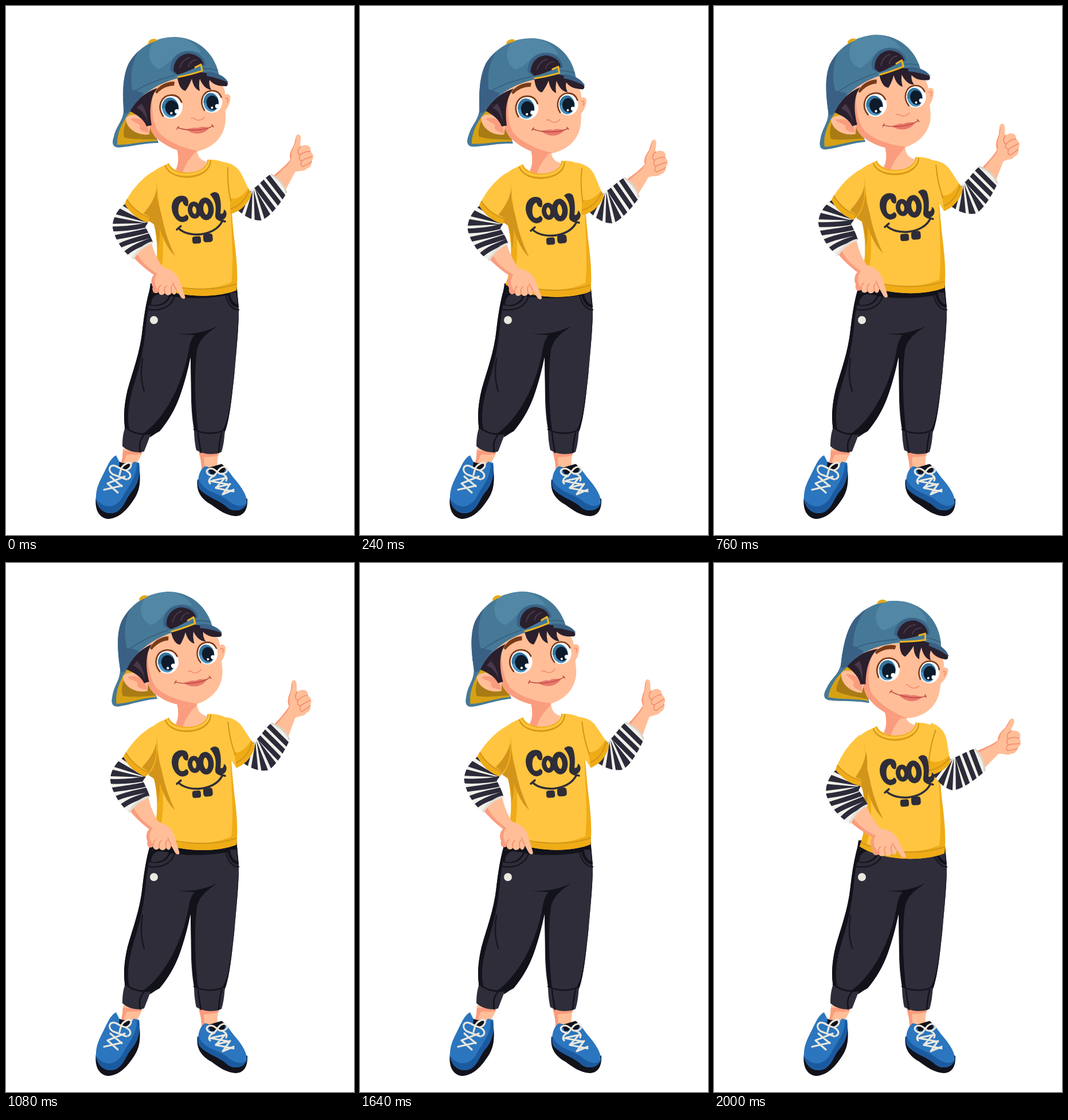
Recreate the animation shown at these times as an HTML page without scripts. Size 607 px wide and 923 px high, loop 2.04 s.

```html
<!DOCTYPE html>
<html lang="en">
<head>
<meta charset="utf-8">
<title>Thumbs up</title>
<style>
@property --q { syntax: "<number>"; inherits: true; initial-value: 0; }
html, body { margin: 0; width: 100%; height: 100%; overflow: hidden; background: #fff; }
svg { display: block; width: 100%; height: 100%; animation: bob 2040ms linear infinite; }

/* --q is the single pose value: positive sinks, negative rises */
@keyframes bob {
  0% { --q: 0 }
  5.88% { --q: 17 }
  7.84% { --q: 20 }
  11.76% { --q: 10 }
  15.69% { --q: -15 }
  19.61% { --q: -40 }
  21.57% { --q: -45 }
  23.53% { --q: -46 }
  27.45% { --q: -40 }
  33.33% { --q: -24 }
  37.25% { --q: -20 }
  52.94% { --q: -21 }
  80.39% { --q: -22.5 }
  84.31% { --q: -20 }
  88.24% { --q: -7 }
  92.16% { --q: 16 }
  95.1% { --q: 36 }
  98.04%, 100% { --q: 48 }
}
.body { transform: translateY(calc(var(--q) * .22px)); }
.arm-l { transform: rotate(calc(var(--q) * -.13deg)); transform-origin: 255px 300px; }
.arm-r { transform: rotate(calc(var(--q) * .35deg)); transform-origin: 390px 280px; }
.head { transform: translateY(calc(var(--q) * .2px)) rotate(calc(var(--q) * .22deg)); transform-origin: 292px 262px; }

.skin { fill: #ffbe98 }
.blush { fill: #fa9c7e }
.shirt { fill: #ffc540 }
.gold { fill: #efac17 }
.amber { fill: #d2941a }
.cloth { fill: #2e2d39 }
.ink { fill: #12121b }
.hair { fill: #2a1f2c }
.cap { fill: #467997 }
.navy { fill: #3a6185 }
.shoe { fill: #2b76bf }
.deep { fill: #1c5a9f }
.knit { fill: #f2f0e9 }
.line { fill: none; stroke-linecap: round; stroke-linejoin: round; }
.seam { stroke: #12121b; stroke-width: 2.5 }
.hem { stroke: #d2941a; stroke-width: 2 }
.fold { stroke: #f08c6e; stroke-width: 1.6 }
.stripe { stroke: #2c2b3a; stroke-width: 8.5; fill: none }
.fan { fill: #2c2b3a }
.lace { stroke: #ebe8df; stroke-width: 3.2 }
.print { stroke: #2e2d39; fill: none; stroke-linecap: round }
</style>
</head>
<body>
<svg viewBox="0 0 607 923" preserveAspectRatio="none">
<defs>
  <clipPath id="knitL"><path id="tubeL" d="M212 343C199 349 185 368 186 387C190 409 206 431 222 441C228 428 242 416 256 412C252 400 246 392 243 385L249 376Z"/></clipPath>
  <clipPath id="knitR"><path id="tubeR" d="M424 319C433 324 445 304 462 293C475 300 486 312 490 326C478 345 462 367 446 374C430 375 416 367 404 356Z"/></clipPath>
  <clipPath id="dome"><path id="crown" d="M205 178C203 150 204 120 214 100C232 70 262 54 296 54C338 56 366 86 372 123C350 118 330 117 312 123C270 131 232 154 216 184C207 190 206 190 205 178Z"/></clipPath>
  <g id="eye">
    <ellipse rx="20" ry="20.5" fill="#fff"/>
    <ellipse cx="-1.500" cy="1" rx="14.500" ry="17.500" fill="#4a93c2"/>
    <path d="M-16 1a14.500 17.500 0 0 1 29 0Z" fill="#35759f"/>
    <ellipse cx="1" cy="2" rx="11.500" ry="13.500" fill="#0d1b2b"/>
    <circle cx="9" cy="9" r="3.800" fill="#fff"/>
    <circle cx="-1" cy="11" r="2.200" fill="#fff"/>
    <path class="line" d="M-16 14C-25-3-15-21 1-20.500C11-20 17-14 19-6" stroke="#7b3c1b" stroke-width="2.800"/>
  </g>
</defs>

<g id="legs">
  <path class="skin" d="M204 772L239 774C236 788 226 800 221 808L199 802C204 790 203 782 204 772ZM336 776L372 777C368 790 368 800 370 812L341 812C342 798 338 786 336 776Z"/>
  <path class="blush" d="M204 776L238 776L236 782C222 784 214 781 210 784L204 800H199C204 790 203 784 204 776ZM336 777L372 778L370 784C358 788 348 786 345 788L347 811H341C342 798 338 786 336 777Z"/>

  <path class="ink" d="M157 856C154 878 162 894 179 895C198 893 210 880 221 864C233 848 235 832 233 810L190 845Z"/>
  <path class="shoe" d="M192 784C183 788 178 800 172 812C164 828 156 842 157 860C160 882 180 890 194 882C206 874 208 862 217 850C230 836 235 818 232 797L223 795C214 808 206 808 198 796Z"/>
  <path class="deep" d="M157 860C160 882 180 890 194 882C206 874 208 862 217 850C230 836 235 818 232 797L228 799C229 820 214 838 206 852C196 874 174 882 157 860Z"/>
  <path class="ink" d="M198 795C205 800 212 795 217 800L213 812C207 812 200 812 197 806Z"/>
  <path class="line lace" d="M182 821L202 838M207 821L177 833L195 849M202 837L171 844M186 817L210 826M186 817C176 810 181 798 192 803C200 807 206 811 210 810C222 805 220 792 209 799C200 803 200 812 198 818M210 811C218 815 219 822 213 825"/>

  <path class="ink" d="M334 826C331 848 342 861 358 870C372 880 384 889 400 890C414 890 422 880 421 860L380 840Z"/>
  <path class="shoe" d="M347 803C336 810 333 828 337 842C350 857 370 861 384 873C396 885 416 881 420 867C421 852 408 836 396 822L382 803C376 812 362 813 352 804Z"/>
  <path class="deep" d="M336 826C334 833 335 838 337 842C350 857 370 861 384 873C396 885 416 881 420 867C408 879 394 868 382 859C364 848 344 846 336 826Z"/>
  <path class="ink" d="M352 806L376 799C382 803 384 808 380 814L357 817Z"/>
  <path class="line lace" d="M357 829L390 835L378 852M383 822L366 841L397 847M360 828L384 823M366 840L391 834M378 852L397 844M363 820C348 820 346 807 358 807C366 808 370 816 374 816C386 817 391 806 380 804C372 805 370 812 363 820C355 823 352 829 356 833M374 816C382 817 387 823 384 828"/>

  <path class="cloth" d="M254 484C245 510 241 540 238 565C234 605 220 640 212 670C205 700 205 722 208 740L252 752C279 736 299 700 308 665L322 612L323 690C324 715 326 730 329 745L381 745C390 725 394 680 398 645C402 600 406 560 406 530L402 480Z"/>
  <path class="ink" d="M254 486C245 510 241 540 238 565C234 605 220 640 212 670C205 700 205 722 208 740L216 742C209 715 215 690 222 664C233 630 240 600 244 560C247 530 251 510 259 490Z"/>
  <path class="ink" d="M299 571C320 574 345 570 368 559C350 572 338 580 333 600C328 640 329 690 335 742L329 744C323 700 323 650 322 612C312 660 298 708 268 742L250 752L238 747C280 718 308 656 318 604C320 588 325 578 329 574C320 574 308 573 299 571Z"/>
  <path class="ink" d="M404 560C402 600 398 650 390 700C387 720 382 736 374 745H381C390 725 394 680 398 645C402 600 406 560 406 530Z"/>
  <path class="ink" d="M252 484L402 480L403 500C360 514 290 512 250 498ZM248 521C249 508 254 500 262 499L288 503C284 520 266 528 248 521ZM386 498L403 496L406 526C394 526 386 512 386 498Z"/>
  <path class="cloth" d="M253 521C253 510 260 503 268 503L284 505C280 518 266 524 253 521ZM391 500L402 500L404 521C396 518 391 510 391 500Z"/>
  <path class="line seam" d="M246 529C270 534 290 524 294 506M383 500C384 516 393 530 406 530M238 615C234 640 237 660 241 672" opacity=".8"/>
  <path class="cloth" d="M208 735C204 745 203 758 203 768C213 778 232 781 241 777L253 746C236 749 220 744 208 735ZM328 739C328 752 330 768 332 775C346 783 364 784 376 778C380 765 381 752 382 739C366 747 344 746 328 739Z"/>
  <path class="line seam" stroke-width="3" d="M208 735C220 745 236 749 253 746M328 739C344 747 366 748 382 739"/>
  <path class="line seam" d="M240 749C233 758 232 766 234 778M335 745C336 756 338 766 340 779M376 745C373 756 372 764 371 779"/>
  <circle cx="258" cy="548" r="7" fill="#ebe8df"/>
</g>

<g class="body">
  <path class="skin" d="M297 245C303 266 300 278 295 286C308 302 344 296 350 272C338 268 333 262 333 245Z"/>
  <path class="blush" d="M297 245C303 266 300 278 297 286L308 291C314 272 324 262 333 252V245Z"/>

  <path class="shirt" d="M284 275C270 280 258 286 250 296L248 372L258 380C265 410 267 450 254 484C290 508 362 512 402 496C405 470 402 440 399 415C396 390 394 365 392 340L400 286C386 272 368 267 352 268C350 296 300 302 284 275Z"/>
  <path class="gold" d="M262 300C266 335 268 360 272 385C276 425 274 455 266 480L254 484C267 450 265 410 258 380L248 374C262 356 264 330 262 300Z"/>
  <path class="gold" d="M392 350C392 390 398 440 393 482C350 500 296 497 256 478L254 484C290 508 362 512 402 496C405 470 402 440 399 415C396 390 394 365 392 340Z"/>
  <path class="amber" d="M263 330C264 350 258 364 248 374L258 381C262 394 265 410 265 424C268 410 268 400 268 388C276 412 284 426 295 436C284 414 276 390 272 368C268 352 266 344 263 330Z"/>
  <path class="line hem" d="M257 477C295 496 360 499 402 485"/>
  <path class="gold" d="M284 274C292 298 350 296 351 268L357 269C358 306 288 310 278 278Z"/>
  <path class="shirt" d="M282 276C290 300 352 298 353 268L356 269C356 301 288 305 279 278Z"/>
  <path class="line hem" d="M278 279C288 308 356 304 357 270"/>

  <g class="arm-r">
    <path class="skin" d="M465 297C478 287 490 276 496 268C493 257 498 250 502 243L506 227C509 221 515 224 514 232C514 238 512 241 514 245C524 239 534 245 531 254C537 258 537 266 533 270C534 278 529 283 525 283C521 290 510 286 504 290L486 324Z"/>
    <path class="blush" d="M465 297C478 287 490 276 496 268C493 257 498 250 502 243L506 227C508 235 501 248 498 256C500 268 494 276 484 284L468 300Z"/>
    <path class="line fold" d="M514 245C508 250 508 256 512 260C518 256 526 252 531 254M513 260C510 265 512 269 516 270C522 266 530 264 534 262M516 270C513 275 514 279 518 280C524 276 530 275 533 271"/>
    <use href="#tubeR" class="knit"/>
    <g clip-path="url(#knitR)">
      <path class="fan" d="M428 322L394 354L410 366ZM430 322L415 372L428 378ZM432 320L434 380L447 380ZM434 318L453 378L464 368Z"/>
      <path class="stripe" d="M436 314L472 362M445 304L481 350M455 295L489 339"/>
    </g>
    <path class="line" d="M463 294C475 301 486 313 489 325" stroke="#d8d5cc" stroke-width="3"/>
    <path class="shirt" d="M376 272C394 273 406 282 412 296L428 329C422 346 408 359 391 363L380 340Z"/>
    <path class="gold" d="M391 335C402 340 414 330 423 318L428 329C422 346 408 359 391 363Z"/>
    <path class="line hem" d="M392 354C406 350 418 338 424 322M387 282C386 304 388 322 392 340"/>
  </g>

  <g role="img" aria-label="COOL">
    <path class="cloth" d="M317 349C312 350 309 346 308 341C301 342 299 355 302 364C305 370 311 368 314 364C320 366 320 374 313 376C302 381 290 368 289 352C289 338 297 331 307 331C317 331 320 340 317 349ZM356 329C361 323 368 324 371 328C376 340 375 355 374 362C378 364 380 360 380 355C387 358 386 370 378 373C370 376 364 372 365 364C367 350 366 340 356 329Z"/>
    <g class="print">
      <ellipse cx="328.500" cy="356" rx="7.500" ry="11" stroke-width="8" transform="rotate(-8 329 356)"/>
      <ellipse cx="348.500" cy="354" rx="9" ry="15" stroke-width="9.500" transform="rotate(-6 348 354)"/>
      <path d="M301 388C318 405 364 402 377 376M298 390L305 384M372 373L382 376" stroke-width="3.500"/>
    </g>
  </g>
  <rect class="cloth" x="325" y="402" width="15" height="12.500" rx="4" transform="rotate(-4 332 408)"/>
  <rect class="cloth" x="344" y="397" width="16.500" height="15" rx="4.500" transform="rotate(-5 352 404)"/>

  <g class="arm-l">
    <path class="skin" d="M224 440C234 424 246 416 254 414C258 430 266 446 273 455C288 460 298 466 302 478L312 506C314 512 308 512 305 508L297 495C298 504 292 506 289 500C286 506 280 506 277 501C273 506 267 505 266 499C259 504 254 498 256 490C252 484 253 474 258 469C246 461 233 450 224 440Z"/>
    <path class="blush" d="M224 440L229 433C238 450 254 461 264 467C258 474 258 484 262 490L266 499C259 504 254 498 256 490C252 484 253 474 258 469C246 461 233 450 224 440Z"/>
    <path class="line fold" d="M266 499C265 493 267 489 270 487M277 501C275 494 277 490 280 488M289 500C287 493 288 489 290 487M297 495L291 483"/>
    <use href="#tubeL" class="knit"/>
    <g clip-path="url(#knitL)">
      <path class="fan" d="M248 377L214 338L203 348ZM246 378L198 353L190 363ZM244 379L187 368L183 380Z"/>
      <path class="stripe" d="M180 389C205 389 228 387 248 381M184 405C208 400 230 397 252 390M195 420C212 410 232 407 256 399M207 433C220 421 236 415 258 407"/>
    </g>
    <path class="line" d="M222 440C228 428 241 417 254 413" stroke="#e2dfd6" stroke-width="4"/>
    <path class="shirt" d="M256 289C237 300 217 323 207 345C217 363 232 373 247 378C256 366 264 350 264 328Z"/>
    <path class="gold" d="M210 338C222 355 236 364 252 369L247 378C232 373 217 363 207 345Z"/>
    <path class="amber" d="M263 318C260 336 250 350 240 362L251 368L247 378C258 366 266 348 263 318Z"/>
    <path class="line hem" d="M211 338C222 355 236 364 250 369"/>
  </g>
</g>

<g class="head">
  <path class="cap" d="M205 174C207 200 193 206 188 228C184 240 186 247 197 247C216 246 240 239 266 239L262 228L220 176Z"/>
  <path d="M217 184C201 204 193 224 194 242C216 243 240 235 264 236C258 224 250 190 244 180Z" fill="#d6a114"/>
  <path d="M213 194C206 208 204 220 206 229C224 234 244 232 262 233L248 205Z" fill="#a97b14"/>
  <path class="skin" d="M377 158C386 150 393 154 391 164C389 174 385 181 379 186Z"/>
  <path class="line fold" d="M382 162C387 158 388 162 386 168"/>
  <path class="skin" d="M244 145C248 190 246 214 262 230C285 250 312 259 336 253C364 246 383 225 383 196L382 150C378 125 340 110 300 112Z"/>
  <path class="blush" d="M245 160C248 190 246 214 262 230C285 250 312 259 336 253C318 250 284 240 266 220C256 206 253 180 256 150Z"/>
  <path class="skin" d="M252 204C240 190 218 185 209 195C208 212 228 227 250 224Z"/>
  <path class="blush" d="M246 206C238 197 226 194 217 197C222 203 230 204 234 209C231 213 234 217 240 219L250 222Z"/>
  <path class="hair" d="M215 183C224 166 240 152 264 143C250 160 250 186 254 208L245 210C242 200 230 190 215 183Z"/>
  <path d="M228 178C238 182 244 192 247 204C246 188 242 178 236 170Z" fill="#48384b"/>

  <use href="#crown" class="cap"/>
  <g clip-path="url(#dome)">
    <path class="navy" d="M200 190V100L240 66C220 90 216 118 220 146L240 152L216 190Z"/>
    <path d="M262 58C244 74 246 100 266 110C280 104 286 96 294 88C304 76 324 76 340 82C332 66 316 56 296 54Z" fill="#5288a5"/>
    <path class="line" d="M204 166C226 142 262 129 294 121M344 109C356 109 366 111 374 114" stroke="#38607f" stroke-width="1.800"/>
  </g>
  <path d="M248 64C249 57 262 55 264 60C260 62 254 63 248 67Z" fill="#e5a91b"/>

  <path class="navy" d="M287 113C285 92 301 79 319 79C336 80 347 91 348 103L340 106L296 120Z"/>
  <path class="hair" d="M292 113C292 95 304 84 319 83C334 85 343 93 344 102L300 121Z"/>
  <path class="line" d="M303 108C306 98 312 92 320 90M318 106C320 98 326 94 332 94" stroke="#48384b" stroke-width="2"/>
  <path class="hair" d="M299 125C301 139 306 147 313 148C319 140 322 132 324 127C326 138 331 146 338 148C336 138 337 132 338 127C342 138 350 146 358 146C354 139 354 133 355 129C361 137 370 140 384 140C392 136 382 126 366 119L330 114Z"/>
  <path class="navy" d="M350 115C366 115 382 122 388 134C380 130 364 124 350 122Z"/>
  <path class="cap" d="M294 121C314 117 328 109 341 102L342 114C330 118 315 122 300 125Z"/>
  <path class="line" d="M300 124C315 121 330 117 342 113L340 102L330 107" stroke="#f1b522" stroke-width="3"/>

  <path d="M260 150C266 138 282 131 294 132L293 139C282 139 271 144 263 153Z" fill="#793a18"/>
  <use href="#eye" transform="translate(288 176) rotate(-7)"/>
  <use href="#eye" transform="translate(359 167) rotate(-7) scale(.91 .94)"/>

  <path class="line fold" d="M323 196C327 193 329 198 333 199C338 200 343 198 346 194" stroke-width="2"/>
  <path d="M314 215C324 213 330 211 334 213C340 210 346 211 355 212C346 225 326 226 314 215Z" fill="#e9776c"/>
  <path class="line" d="M299 212C314 218 344 219 361 209M298 215L301 210M359 207L362 211" stroke="#b9493f" stroke-width="1.500"/>
</g>
</svg>
</body>
</html>
```
